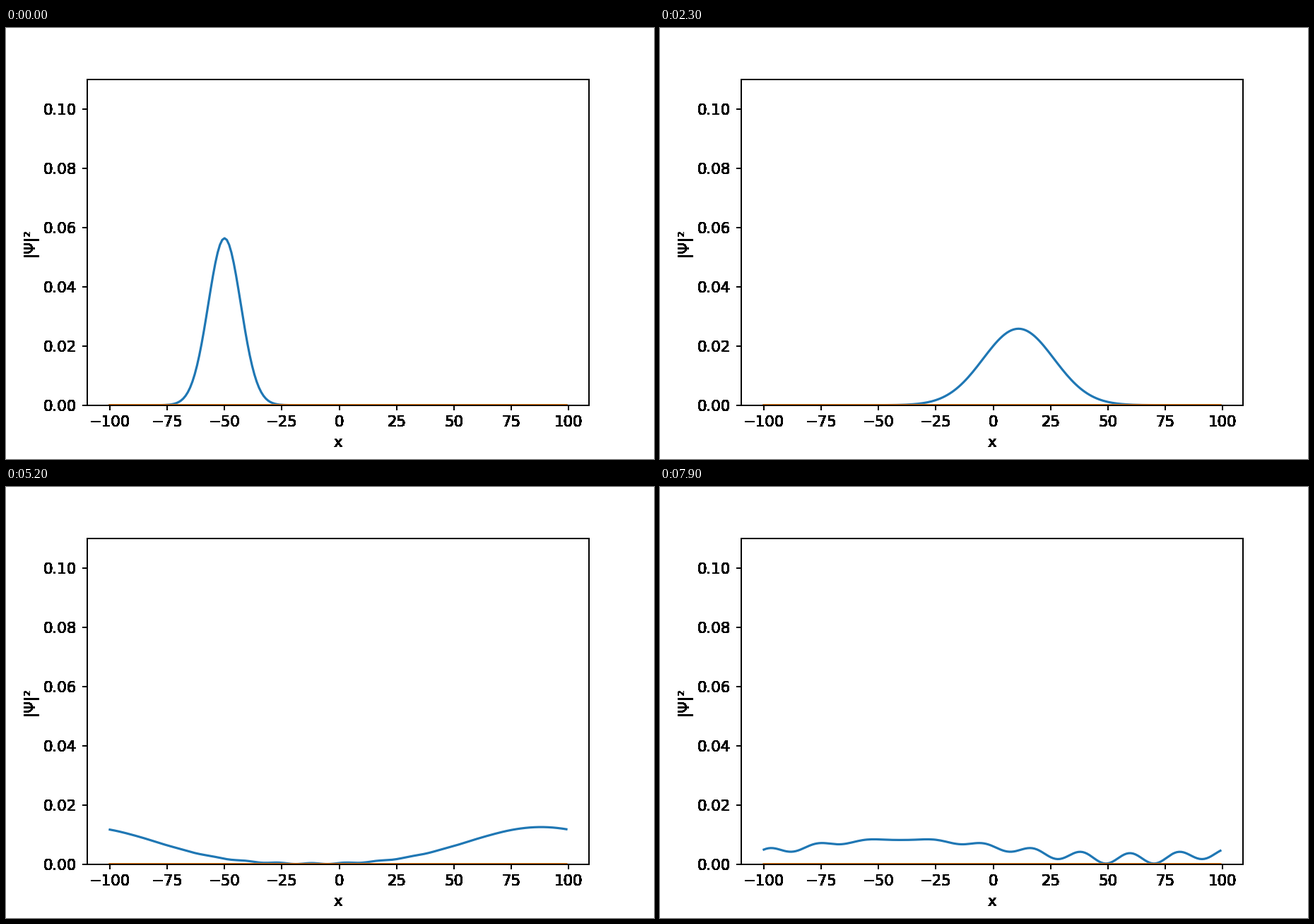
A matplotlib script that plays this animation: 917 px wide and 611 px high, repeating every 8 s.

```python
import numpy as np
import matplotlib.pyplot as plt
from matplotlib.animation import FuncAnimation

FRAMES = 80
INTERVAL = 100      # ms
DT = 8.445          # time units per frame
A = 10.0            # initial packet width
X0 = -50.0          # initial centre
K0 = np.pi / 10     # mean wave number

# Free Gaussian packet on a periodic grid, evolved exactly in Fourier space
x = np.arange(-100.0, 100.0)
k = 2 * np.pi * np.fft.fftfreq(x.size, d=1.0)
psi0 = np.exp(-((x - X0) ** 2) / (2 * A**2) + 1j * K0 * x)
psi0 /= np.sqrt(np.sum(np.abs(psi0) ** 2))
spectrum = np.fft.fft(psi0)


def density(t):
    psi = np.fft.ifft(spectrum * np.exp(-0.5j * k**2 * t))
    return np.abs(psi) ** 2


def harden(img, dpi):
    """Make every touched pixel opaque, for hard, heavy edges."""
    img = np.array(img)
    img[..., 3] = img[..., 3] > 0
    return img, 0, 0


plt.rcParams["font.family"] = "DejaVu Sans"
plt.rcParams["font.size"] = 10

fig, ax = plt.subplots(figsize=(6.0033, 4.0), dpi=152.75)
fig.subplots_adjust(left=0.125, right=0.9, bottom=0.125, top=0.88)

wave, = ax.plot(x, density(0), color="#1f77b4", lw=1.5)
ax.plot(x, np.zeros_like(x), color="#ff7f0e", lw=1.5, snap=False)  # flat potential

ax.set_xlim(-109.95, 108.95)
ax.set_ylim(0, 0.11)
ax.set_xticks(np.arange(-100, 101, 25))
ax.set_yticks(np.arange(0, 0.11, 0.02))
ax.set_xlabel("x")
ax.set_ylabel("|Ψ|²")

for part in (ax.xaxis, ax.yaxis, *ax.spines.values()):
    part.set_agg_filter(harden)


def update(frame):
    wave.set_ydata(density(frame * DT))
    return wave,


anim = FuncAnimation(fig, update, frames=FRAMES, interval=INTERVAL,
                     repeat=True, repeat_delay=0, blit=False)
plt.show()
```
